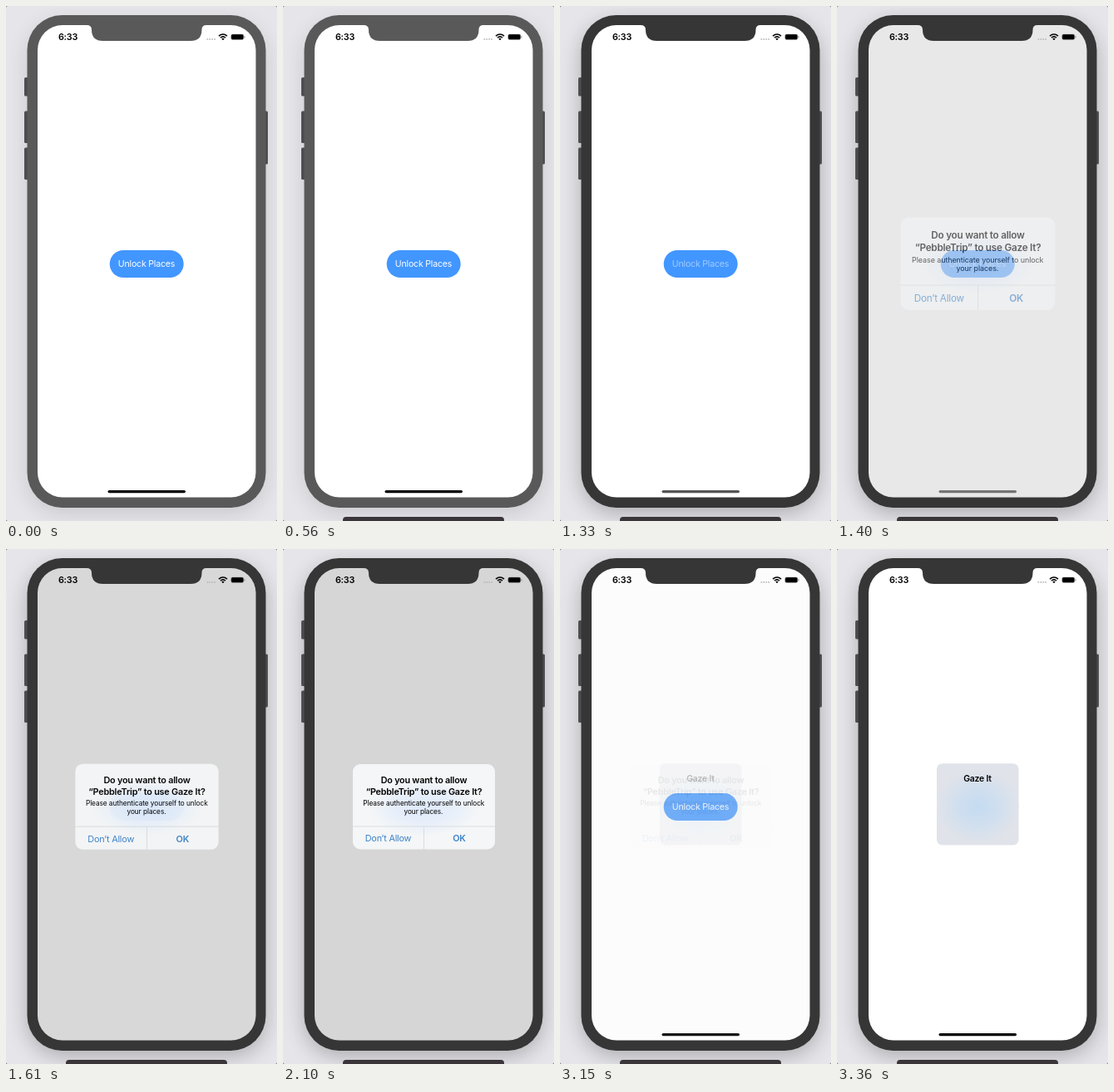
Animation, 326 px wide and 620 px high, one loop 8 s. Source, as an HTML page:

```html
<!DOCTYPE html>
<html lang="en">
<head>
<meta charset="utf-8">
<title>Unlock Places</title>
<style>
  html, body { margin: 0; height: 100%; overflow: hidden; background: #55565c; }
  svg { display: block; width: 100vw; height: 100vh; }
  text { font: 10.8px Inter, sans-serif; letter-spacing: -.02em; text-anchor: middle; }
  .bold { font-weight: 600; }
  .small { font-size: 8.24px; letter-spacing: -.008em; }
  .link { fill: #3b82c8; }
</style>
</head>
<body>
<svg viewBox="0 0 326 620">
  <defs>
    <filter id="blur" x="-30%" y="-30%" width="160%" height="160%"><feGaussianBlur stdDeviation="13"/></filter>
    <radialGradient id="alertGlow">
      <stop offset="0" stop-color="#dfeafb"/>
      <stop offset=".5" stop-color="#e6eefa"/>
      <stop offset="1" stop-color="#f4f6f7"/>
    </radialGradient>
    <radialGradient id="scanGlow">
      <stop offset="0" stop-color="#c4dbf1"/>
      <stop offset=".5" stop-color="#d0dfef"/>
      <stop offset="1" stop-color="#e0e3e9"/>
    </radialGradient>
    <clipPath id="screen"><rect x="38" y="23" width="262.5" height="568.5" rx="30"/></clipPath>
  </defs>

  <rect width="326" height="620" rx="2" fill="#e6e5ea"/>
  <rect id="shadow" x="26" y="20" width="286" height="590" rx="42" filter="url(#blur)"/>

  <g fill="#4d4d51">
    <rect x="22" y="86" width="6" height="22.5" rx="1.5"/>
    <rect x="22" y="126.5" width="6" height="38.5" rx="1.5"/>
    <rect x="22" y="170.5" width="6" height="38.5" rx="1.5"/>
    <rect x="309" y="126.5" width="6" height="64" rx="1.5"/>
  </g>
  <rect class="bezel" x="25.5" y="11" width="287" height="593" rx="42"/>

  <g clip-path="url(#screen)">
    <rect x="38" y="23" width="263" height="569" fill="#fff"/>
    <rect x="124.7" y="294" width="89" height="33" rx="16.5" fill="#4296ff"/>
    <text id="label" x="169" y="314.4" fill="#fff" style="font-size:10.6px">Unlock Places</text>
    <rect id="home" x="122.5" y="583" width="93.5" height="3.2" rx="1.6"/>
    <rect id="dim" x="38" y="23" width="263" height="569"/>

    <g id="alert">
      <rect x="84" y="259" width="171" height="102.5" rx="9" fill="#f4f6f7"/>
      <ellipse cx="169.5" cy="311" rx="66" ry="34" fill="url(#alertGlow)"/>
      <path d="M84 334H255M169.5 334V361.5" stroke="#d3d7da" stroke-width=".8"/>
      <text class="bold" x="169.5" y="282">Do you want to allow</text>
      <text class="bold" x="169.5" y="296">“PebbleTrip” to use Gaze It?</text>
      <text class="small" x="169.3" y="308.7">Please authenticate yourself to unlock</text>
      <text class="small" x="169" y="318.7">your places.</text>
      <text class="link" x="126.5" y="352.4">Don’t Allow</text>
      <text class="link bold" x="212" y="352.4">OK</text>
    </g>

    <g id="scan">
      <rect x="120" y="258.3" width="98.5" height="98.2" rx="6.5" fill="#e0e3e9"/>
      <ellipse cx="169.5" cy="310" rx="49" ry="44" fill="url(#scanGlow)"/>
      <text class="bold" x="169" y="280.3" style="font-size:10.4px">Gaze It</text>
    </g>
  </g>

  <path class="bezel" d="M97 22H241V23Q235.5 23 235.5 28.5Q235.5 42 222 42H116.5Q103 42 103 28.5Q103 23 97 23Z"/>
  <text class="bold" x="74.5" y="41">6:33</text>
  <path d="M241.5 40H252" stroke="#b4b4b4" stroke-width="1.6" stroke-dasharray="1.7 1.2"/>
  <g fill="none" stroke="#000" stroke-width="1.6">
    <path d="M256 36.2Q261 31.8 266 36.2M258 38.2Q261 35.6 264 38.2"/>
  </g>
  <path d="M261 41.3L259.3 39.5Q261 38.2 262.7 39.5Z"/>
  <rect x="270.8" y="34" width="15" height="6.6" rx="1.8" stroke="#999" stroke-width=".5"/>
  <path d="M286.9 36V38.6" stroke="#888" stroke-width=".9"/>

  <rect id="bar" x="72" y="615" width="194" height="12" rx="4" fill="#393538"/>
</svg>
<script>
const LOOP = 8000, STEP = 70;
const $ = id => document.getElementById(id);
const fade = (id, v) => $(id).setAttribute("opacity", v);
const clamp = v => Math.min(1, Math.max(0, v));
const settle = (t, start, tau) => t < start ? 0 : 1 - Math.exp((start - t) / tau);
const bezels = document.querySelectorAll(".bezel");

function draw(t) {
  const focused = t >= 1120;
  const shown = settle(t, 1330, 83);
  const closed = t >= 3360 ? 1 : settle(t, 2940, 83);
  const alpha = shown * (1 - closed);
  const zoom = 1.2 - .2 * shown;

  bezels.forEach(b => b.setAttribute("fill", focused ? "#363636" : "#595959"));
  fade("shadow", focused ? .26 : .13);
  fade("bar", t >= 560 ? 1 : 0);
  fade("label", t >= 1260 && t < 2940 ? .5 : 1);
  fade("home", Math.max(clamp(1 - (t - 1190) / 420), closed));
  fade("dim", .16 * alpha);
  fade("alert", alpha);
  $("alert").setAttribute("transform",
    `translate(169.5 310.5) scale(${zoom}) translate(-169.5 -310.5)`);
  fade("scan", clamp((t - 3080) / 280));
}

function tick(now) {
  const t = now % LOOP;
  draw(Math.floor(t / STEP) * STEP);
  requestAnimationFrame(tick);
}
draw(0);
requestAnimationFrame(tick);
</script>
</body>
</html>
```
